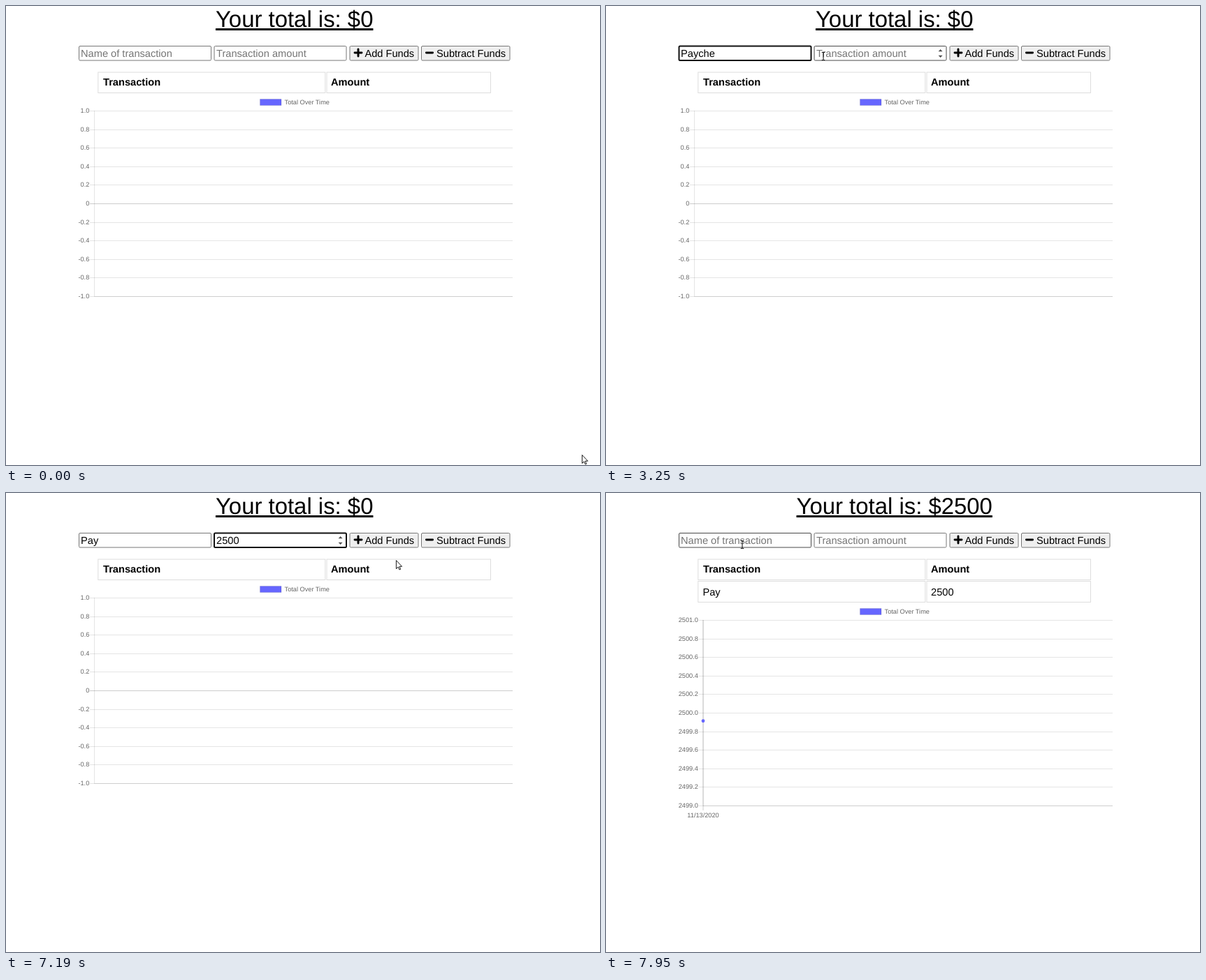
Animation of 850 by 658 pixels, one loop 8000 ms. Source, as an HTML page:

```html
<!DOCTYPE html>
<html lang="en">
<head>
<meta charset="utf-8">
<title>Budget tracker</title>
<style>
  html, body { margin: 0; width: 100%; height: 100%; overflow: hidden; background: #fff; }
  body { font-family: "Liberation Sans", Arial, sans-serif; position: relative; text-rendering: geometricPrecision; }
  #title { position: absolute; top: 0; left: 0; width: 825.4px; text-align: center; font-size: 32.9px; line-height: 38px; text-decoration: underline; white-space: pre; }
  svg { position: absolute; top: 0; left: 0; font-size: 14.63px; }
  .field { fill: #fff; stroke: #767676; }
  .field.hover { stroke: #484848; }
  .field.focus { stroke: #101010; stroke-width: 2; }
  .button { fill: #efefef; stroke: #767676; }
  .button.hover { fill: #e3e3e3; stroke: #505050; }
  .hint { fill: #757575; }
  .cell { fill: none; stroke: #ddd; }
  .head { font-weight: bold; }
  .chart { font-size: 9.2px; fill: #666; }
  .grid { stroke: #000; stroke-opacity: .1; }
  .zero { stroke: #000; stroke-opacity: .2; }
  .swatch { fill: #66f; stroke: #000; stroke-opacity: .1; }
</style>
</head>
<body>
<div id="title"></div>
<svg width="850" height="658" viewBox="0 0 850 658">
  <rect id="name" class="field" x="104.5" y="57.5" width="189" height="20.5" rx="1.5"/>
  <rect id="amount" class="field" x="298" y="57.5" width="189" height="20.5" rx="1.5"/>
  <rect id="add" class="button" x="492" y="57.5" width="98" height="20.5" rx="1.5"/>
  <rect id="sub" class="button" x="594.5" y="57.5" width="126.5" height="20.5" rx="1.5"/>
  <text id="nameText" x="107" y="72.6"></text>
  <text id="amountText" x="301" y="72.6"></text>
  <path id="spinner" fill="#505050" d="M475.6 65.2L478.6 62l3 3.2zM475.6 70.8l3 3.2 3-3.2z"/>
  <rect id="caret" y="60" width="1" height="16"/>
  <path d="M499 67H509M504 62V72" stroke="#000" stroke-width="2.9" stroke-linecap="round"/>
  <path d="M601.4 67H610.6" stroke="#000" stroke-width="2.9" stroke-linecap="round"/>
  <text x="513.4" y="72.6">Add Funds</text>
  <text x="616" y="72.6">Subtract Funds</text>

  <rect class="cell" x="131.8" y="95" width="325" height="29.5"/>
  <rect class="cell" x="459" y="95" width="234.5" height="29.5"/>
  <text class="head" x="139" y="114.4">Transaction</text>
  <text class="head" x="465" y="114.4">Amount</text>
  <g id="row">
    <rect class="cell" x="131.8" y="126.5" width="325" height="30"/>
    <rect class="cell" x="459" y="126.5" width="234.5" height="30"/>
    <text x="138.4" y="146.6">Pay</text>
    <text x="465" y="146.6">2500</text>
  </g>

  <g id="empty" class="chart"></g>
  <g id="filled" class="chart"></g>
  <circle id="dot" cx="139" r="2.4" fill="#66f"/>

  <g id="pointer">
    <circle id="click" r="9" fill="#f4f000" fill-opacity=".65"/>
    <path id="arrow" d="M.4.6V12.6L3.2 10 5 14 6.7 13.3 5 9.3H8.6Z" fill="#fff" stroke="#000" stroke-width=".9"/>
    <path id="beam" d="M-2.2-5.6H-.6L0-5 .6-5.6H2.2M0-5V5M-2.2 5.6H-.6L0 5 .6 5.6H2.2" fill="none" stroke="#000"/>
  </g>
</svg>
<script>
const LOOP = 8000, FOCUS = 550, TAB = 4680, PRESS = 7440, ADDED = 7490, CLEARED = 7570;
const $ = id => document.getElementById(id);
const el = {};
document.querySelectorAll('[id]').forEach(e => el[e.id] = e);
const show = (e, on) => e.setAttribute('visibility', on ? 'visible' : 'hidden');
const within = (t, a, b) => t >= a && t < b;

// Chart frame: top edge, axis position, value in the middle, decimals for it
function chart(top, axis, mid, midLabel) {
  const line = (x1, y1, x2, y2, cls = 'grid') =>
    `<line class="${cls}" x1="${x1}" y1="${y1}" x2="${x2}" y2="${y2}"/>`;
  let out = `<rect class="swatch" x="363.5" y="${top - 16.5}" width="30.5" height="9"/>` +
    `<text x="398.6" y="${top - 9.2}">Total Over Time</text>`;
  for (let i = 0; i <= 10; i++) {
    const y = Math.round(top + i * 26.6) + .5;
    const label = i === 5 ? midLabel : (mid + 1 - i * .2).toFixed(1);
    out += line(axis - 6.5, y, 725, y, i === 5 && !mid ? 'zero' : 'grid') +
      `<text x="${axis - 7.2}" y="${y + 2.7}" text-anchor="end">${label}</text>`;
  }
  return out + line(axis, top + 266.5, 725, top + 266.5) + line(axis, top, axis, top + 266.5);
}
el.empty.innerHTML = chart(150, 126.5, 0, '0');
el.filled.innerHTML = chart(182, 139, 2500, '2500.0') +
  '<line class="zero" x1="139" y1="182" x2="139" y2="455"/>' +
  '<text x="139" y="464.8" text-anchor="middle">11/13/2020</text>';

// [time, value] steps
const nameSteps = [[0, ''], [1940, 'P'], [2130, 'Pa'], [2270, 'Pay'], [2410, 'Payc'], [2550, 'Paych'],
  [2690, 'Payche'], [3620, 'Paych'], [3730, 'Payc'], [3840, 'Pay'], [CLEARED, '']];
const amountSteps = [[0, ''], [5930, '2'], [6200, '25'], [6370, '250'], [6530, '2500'], [CLEARED, '']];
const caretOff = [[1060, 1620], [3250, 3620], [4270, TAB], [5190, 5700], [7060, ADDED]];
const stepAt = (steps, t) => steps.filter(s => s[0] <= t).pop()[1];

// Pointer moves: start, end, from, bend, to
const moves = [
  [30, 510, [824, 643], [442, 120], [190, 61]],
  [640, 1000, [190, 61], [245, 72], [311, 72]],
  [6980, 7190, [311, 72], [440, 92], [558, 96]],
  [7200, 7370, [558, 96], [556, 82], [553, 71]],
  [7570, 7930, [553, 71], [375, 76], [195, 74]]
];
const ease = p => p * p * (3 - 2 * p);
function pointerAt(t) {
  const [a, b, p, c, q] = moves.filter(m => m[0] <= t).pop() || moves[0];
  const u = ease(Math.min(1, Math.max(0, (t - a) / (b - a)))), v = 1 - u;
  return [0, 1].map(i => v * v * p[i] + 2 * u * v * c[i] + u * u * q[i]);
}

function fill(text, value, hint) {
  const s = value || hint;
  if (text.textContent !== s) text.textContent = s;
  text.setAttribute('class', value ? '' : 'hint');
}

function hit(box, x, y) {
  const n = k => +box.getAttribute(k);
  return within(x, n('x'), n('x') + n('width')) && within(y, n('y'), n('y') + n('height'));
}

function draw(t) {
  const added = t >= ADDED;
  const title = 'Your total is: $' + (added ? 2500 : 0);
  if (el.title.textContent !== title) el.title.textContent = title;

  const [x, y] = pointerAt(t);
  const focus = within(t, FOCUS, TAB) ? 'name' : within(t, TAB, PRESS) ? 'amount' : '';
  const over = ['name', 'amount', 'add', 'sub'].find(id => hit(el[id], x, y));
  for (const id of ['name', 'amount', 'add', 'sub']) {
    const base = id === 'name' || id === 'amount' ? 'field' : 'button';
    el[id].setAttribute('class', base + (id === over ? ' hover' : '') + (id === focus ? ' focus' : ''));
  }

  const values = { name: stepAt(nameSteps, t), amount: stepAt(amountSteps, t) };
  fill(el.nameText, values.name, 'Name of transaction');
  fill(el.amountText, values.amount, 'Transaction amount');
  show(el.spinner, focus === 'amount' || over === 'amount');

  show(el.caret, focus && !caretOff.some(([a, b]) => within(t, a, b)));
  if (focus) {
    const text = el[focus + 'Text'];
    const width = values[focus] ? text.getComputedTextLength() : 0;
    el.caret.setAttribute('x', Math.round(+text.getAttribute('x') + width));
  }

  show(el.row, added);
  show(el.empty, !added);
  show(el.filled, added);
  show(el.dot, added);
  const rise = 1 - (1 - Math.max(0, t - ADDED) / 1000) ** 4;
  el.dot.setAttribute('cy', 448.5 - 133 * rise);

  const typing = over === 'name' || over === 'amount';
  el.pointer.setAttribute('transform', `translate(${x} ${y})`);
  show(el.arrow, !typing);
  show(el.beam, typing);
  show(el.click, within(t, FOCUS, 640) || within(t, PRESS, ADDED));
}

const start = performance.now();
function tick() {
  draw((performance.now() - start) % LOOP);
  requestAnimationFrame(tick);
}
tick();
</script>
</body>
</html>
```
